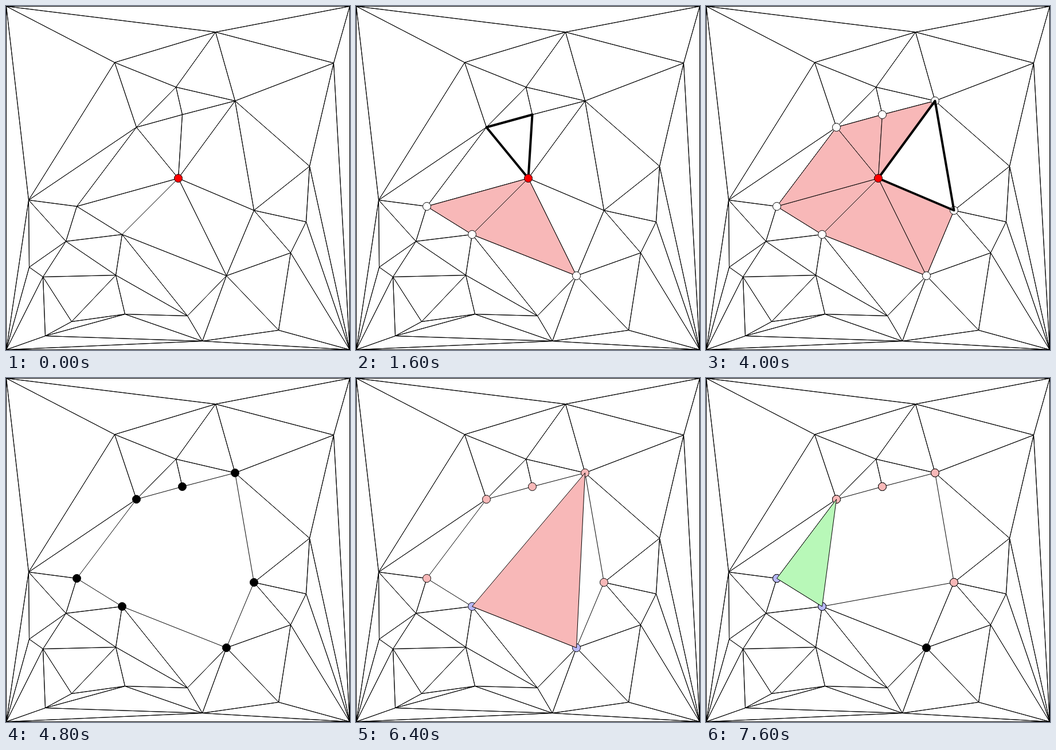
Write an HTML page with a canvas that moves like this. It is 600 px wide and 600 px high and loops after 8 s.

```html
<!DOCTYPE html>
<html lang="en">
<head>
<meta charset="utf-8">
<title>Removing a vertex from a triangulation</title>
<style>
html, body { margin: 0; width: 100%; height: 100%; overflow: hidden; background: #fff; }
canvas { display: block; width: 600px; height: 600px; }
</style>
</head>
<body>
<canvas id="stage" width="600" height="600"></canvas>
<script>
const ctx = document.getElementById('stage').getContext('2d');
const LOOP = 8000;
const PINK = '#f8b8b8', BLUE = '#b8b8f8', GREEN = '#b8f8b8', RED = '#f00', BLACK = '#000', WHITE = '#fff';

// W..Z corners, P the removed vertex, A..G its neighbours, lower case the rest
const pts = {
  W: [0, 0], X: [599, 0], Y: [599, 599], Z: [0, 599], P: [300, 300],
  A: [227, 211], B: [307, 189], C: [399, 165], D: [432, 356],
  E: [384, 470], F: [202, 398], G: [123, 349],
  a: [365, 45], b: [189, 98], c: [571, 99], h: [296, 141], e: [529, 279],
  f: [523, 376], g: [496, 430], i: [39, 338], j: [104, 410], k: [40, 455],
  l: [64, 472], m: [191, 469], n: [114, 550], o: [207, 537], p: [316, 540],
  q: [342, 584], r: [475, 565], s: [68, 575]
};

// Each word: a vertex followed by the vertices it is joined to
const outer = ('WXZabi XYac YZcefgrq Ziklsq abhCc bhAi cCe hABC AGi CeD DefgE ' +
  'ef fg gEr Erqp FjmpE Gij ijk jmlk kl lmns mnop nos opsq pq qrs AB BC GF').split(' ');
outer[0] = 'Wabi';
outer[1] = 'Xac';
outer[2] = 'Ycefgrq';
const RING = 'ABCDEFG';
const marked = ['FE', 'GF', 'AB', 'BC', 'ED', 'GA', 'CD'];
const tested = 'GABCD';

const onRing = (u, v) => {
  const d = Math.abs(RING.indexOf(u) - RING.indexOf(v));
  return RING.includes(u) && RING.includes(v) && (d === 1 || d === 6);
};

function path(names, close) {
  ctx.beginPath();
  for (const n of names) ctx.lineTo(...pts[n]);
  if (close) ctx.closePath();
}

// An edge between two triangles is stroked once for each of them
function edge(u, v, times = 1) {
  path(u + v);
  for (let i = 0; i < times; i++) ctx.stroke();
}

function triangle(names, fill) {
  path(names, true);
  ctx.fillStyle = fill;
  ctx.fill();
  ctx.stroke();
}

function bold(names) {
  path(names, true);
  ctx.lineWidth = 4;
  ctx.stroke();
  ctx.lineWidth = 1;
}

function dots(names, fill) {
  ctx.fillStyle = fill;
  for (const n of names) {
    ctx.beginPath();
    ctx.arc(...pts[n], 7, 0, Math.PI * 2);
    ctx.fill();
    ctx.stroke();
  }
}

function mesh(ringTimes) {
  path('WXYZ', true);
  ctx.stroke();
  for (const [u, ...ends] of outer) {
    for (const v of ends) if (!onRing(u, v)) edge(u, v, 2);
  }
  for (let i = 0; i < 7; i++) edge(RING[i], RING[(i + 1) % 7], ringTimes);
}

function markStar(t) {
  mesh(2);
  for (const n of RING) edge('P', n, 2);
  const step = Math.floor((t - 400) / 200);
  if (step >= 0) {
    const current = Math.floor(step / 3), phase = step % 3;
    const filled = marked.slice(0, current + (phase > 0));
    const dotted = marked.slice(0, current + (phase > 1));
    filled.forEach(side => triangle('P' + side, PINK));
    dots(new Set(dotted.join('')), WHITE);
    if (phase < 2) bold('P' + marked[current]);
  }
  dots('P', RED);
}

function fillHole(t) {
  mesh(1);
  const step = Math.floor((t - 4800) / 400);
  if (step < 1) return dots(RING, t < 4800 ? WHITE : BLACK);
  if (step < 6) {
    const tip = tested[step - 1];
    dots('ABCDG', PINK);
    dots('EF', BLUE);
    triangle('FE' + tip, tip === 'D' ? GREEN : PINK);
    return;
  }
  edge('E', 'F');
  edge('E', 'D');
  edge('F', 'D');
  dots(RING, BLACK);
  if (step > 6) {
    dots('ABCD', PINK);
    dots('FG', BLUE);
    triangle('FGA', GREEN);
  }
}

function draw(t) {
  ctx.setTransform(1, 0, 0, 1, 0, 0);
  ctx.fillStyle = WHITE;
  ctx.fillRect(0, 0, 600, 600);
  ctx.translate(0.5, 0.5);
  ctx.strokeStyle = BLACK;
  ctx.lineWidth = 1;
  ctx.lineJoin = 'round';
  if (t < 4600) markStar(t);
  else fillHole(t);
}

const start = performance.now();
function tick() {
  draw((performance.now() - start) % LOOP);
  requestAnimationFrame(tick);
}
tick();
</script>
</body>
</html>
```
